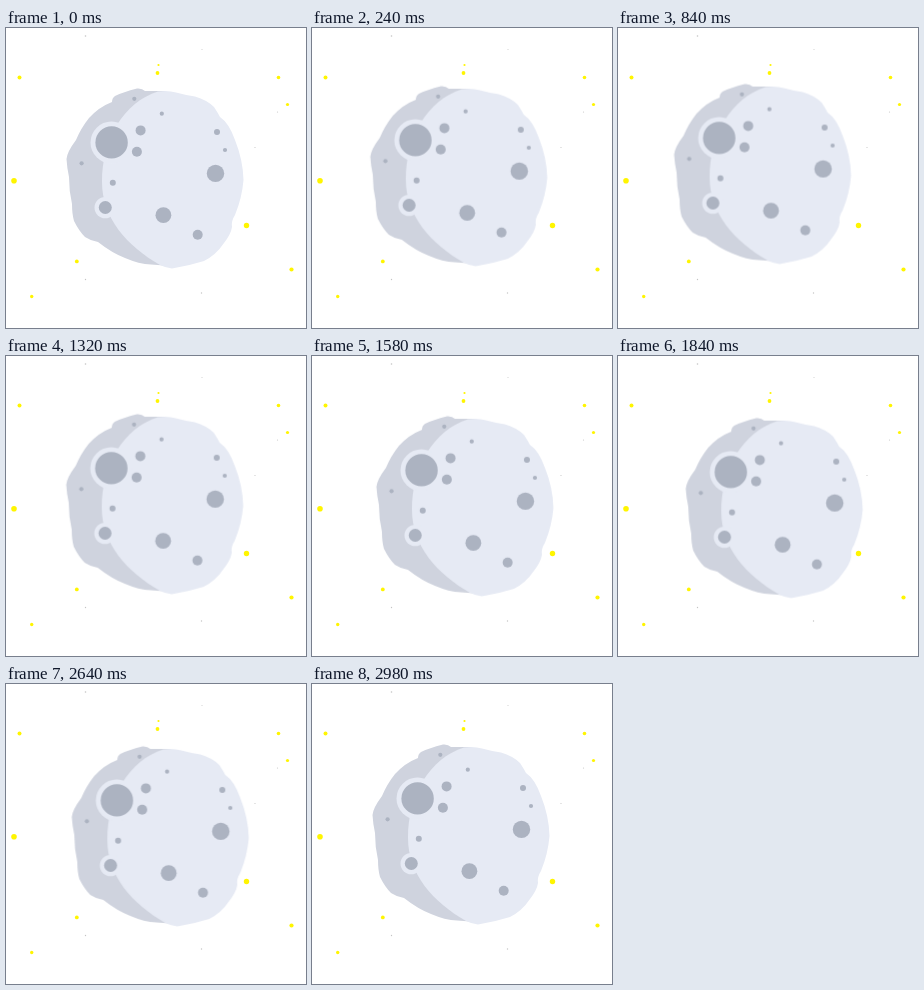
Animation of 300 by 300 pixels, one loop 3000 ms. Source, as an HTML page:

```html
<!DOCTYPE html>
<html lang="en">
<head>
<meta charset="utf-8">
<title>Drifting moon</title>
<style>
  html, body { margin: 0; width: 100%; height: 100%; overflow: hidden; background: #fff; }
  svg { display: block; width: 100vw; height: 100vh; }
  .stars { fill: #fff500; }
  .specks { fill: #c4c4c4; }
  .light { fill: #e6eaf4; }
  .dark { fill: #cfd3de; }
  .craters { fill: #acb3c1; }
  .moon { animation: drift 3s linear infinite; }

  @keyframes drift {
    0%      { transform: translate(0, 0); }
    6.667%  { transform: translate(-1.9px, -2px); }
    13.333% { transform: translate(-3.4px, -3.5px); }
    20%     { transform: translate(-4.3px, -4.3px); }
    26.667% { transform: translate(-4.6px, -4.5px); }
    33.333% { transform: translate(-3.8px, -4.2px); }
    40%     { transform: translate(-1.9px, -3.3px); }
    46.667% { transform: translate(.8px, -1.6px); }
    53.333% { transform: translate(4.2px, -.1px); }
    60%     { transform: translate(6.8px, 1.35px); }
    66.667% { transform: translate(8.8px, 2.5px); }
    73.333% { transform: translate(9.7px, 3.1px); }
    80%     { transform: translate(8.6px, 2.9px); }
    86.667% { transform: translate(5.9px, 2.1px); }
    93.333% { transform: translate(2.8px, 1.1px); }
    99.333%, 100% { transform: translate(0, 0); }
  }
</style>
</head>
<body>
<svg viewBox="0 0 300 300">
  <g class="stars">
    <circle cx="13.5" cy="49.5" r="2"/>
    <circle cx="152.5" cy="37" r="1.1"/>
    <circle cx="151.5" cy="45" r="1.9"/>
    <circle cx="272.5" cy="49.5" r="1.8"/>
    <circle cx="281.5" cy="76.5" r="1.6"/>
    <circle cx="8" cy="152.7" r="2.8"/>
    <circle cx="240.5" cy="197.5" r="2.7"/>
    <circle cx="285.5" cy="241.5" r="2.1"/>
    <circle cx="70.8" cy="233.4" r="1.9"/>
    <circle cx="25.7" cy="268.5" r="1.7"/>
  </g>
  <g class="specks">
    <circle cx="79.5" cy="8" r=".8"/>
    <circle cx="196" cy="21.5" r=".5"/>
    <circle cx="271.5" cy="84" r=".6"/>
    <circle cx="249" cy="119.5" r=".6"/>
    <circle cx="79.5" cy="251.5" r=".7"/>
    <circle cx="195.5" cy="265" r=".7"/>
  </g>
  <g class="moon">
    <path class="dark" d="M160 63 L139 63 Q136 60 131 60.5 Q117 64 109 68 Q106 70 106 74
      Q93 79 83 90 Q75 100 70 112 Q61 124 60.5 131 Q61 140 63 149 Q63 163 66 176
      Q66 186 68 193 Q73 203 79 209 Q85 213 92 214 Q106 225 119 230 Q133 236 145 236.5 L165 238 Z"/>
    <path class="light" d="M152 63.5 Q162 62 170 64.5 Q179 67 189 68.5 Q201 72 208 79 Q212 85 214 89
      Q223 95 229 112 Q237 132 237.5 152 Q236 170 229 187 Q225 193 226 199 Q225 206 218 215
      Q210 227 198 233 Q182 238 166 240.5 Q160 240 154 237
      C121 218 96 190 96 154 C96 111 118 74 152 63.5 Z"/>
    <g class="light">
      <circle cx="105.5" cy="114.5" r="21"/>
      <circle cx="99.2" cy="179.6" r="10.7"/>
    </g>
    <g class="craters">
      <circle cx="105.6" cy="114.4" r="16.2"/>
      <circle cx="99.3" cy="179.5" r="6.5"/>
      <circle cx="134.6" cy="102.4" r="5"/>
      <circle cx="130.9" cy="123.7" r="5"/>
      <circle cx="106.8" cy="154.7" r="3"/>
      <circle cx="155.8" cy="85.7" r="2.1"/>
      <circle cx="128.3" cy="70.8" r="2.1"/>
      <circle cx="75.6" cy="135.3" r="2.1"/>
      <circle cx="211" cy="104" r="3"/>
      <circle cx="219" cy="122" r="2.1"/>
      <circle cx="209.5" cy="145.4" r="8.7"/>
      <circle cx="157.4" cy="187.2" r="7.9"/>
      <circle cx="191.7" cy="206.7" r="5"/>
    </g>
  </g>
</svg>
</body>
</html>
```
